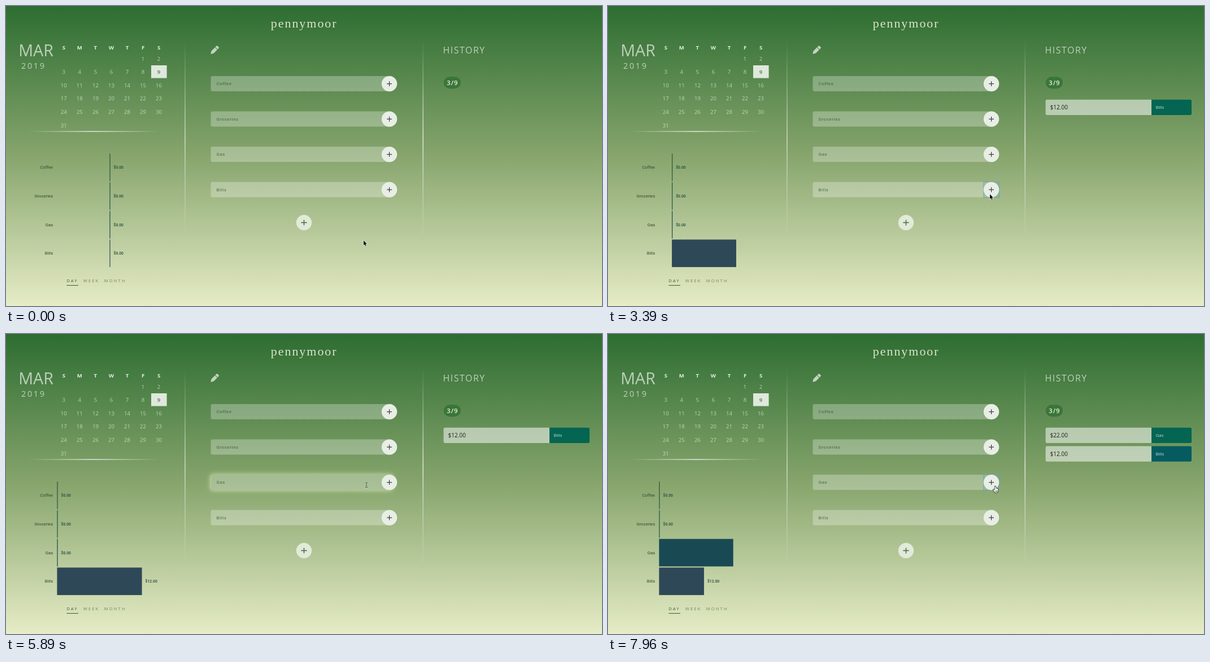
An HTML page with a canvas that plays this animation: 1055 px wide and 531 px high, repeating every 8000 ms.

```html
<!DOCTYPE html>
<html lang="en">
<head>
<meta charset="utf-8">
<title>Budget tracker</title>
<style>
html, body { margin: 0; width: 100%; height: 100%; overflow: hidden; background: #87a56d; }
canvas { display: block; width: 1055px; height: 531px; }
</style>
</head>
<body>
<canvas id="stage"></canvas>
<script>
const W = 1055, H = 531, LOOP = 8000;
const canvas = document.getElementById('stage');
const ctx = canvas.getContext('2d');
const dpr = window.devicePixelRatio || 1;
canvas.width = W * dpr;
canvas.height = H * dpr;

const OPEN = '"Open Sans", "Noto Sans", sans-serif';
const ROBOTO = 'Roboto, Arial, sans-serif';
const SERIF = '"Liberation Serif", "Times New Roman", serif';

const names = ['Coffee', 'Groceries', 'Gas', 'Bills'];
const barColors = ['#27543c', '#1b5548', '#194a54', '#2f4858'];
const fieldY = i => 124 + 62.5 * i;
const barY = i => 261.3 + 50.7 * i;

// Event times in ms
const FOCUS_BILLS = 700, ADD_BILLS = 2740, SHOW_VALUE = 4180;
const FOCUS_GAS = 5250, ADD_GAS = 7120, GROW = 1000;

const typed = {
  3: [[1450, '1'], [1760, '12'], [ADD_BILLS, '']],
  2: [[6050, '2'], [6350, '22'], [ADD_GAS, '']]
};

const path = [
  [0, 633, 415], [120, 633, 415], [650, 638, 326], [1850, 638, 326],
  [2300, 675, 333], [2720, 676, 333], [3450, 676, 333], [4020, 639, 281],
  [4140, 639, 281], [4500, 638, 267], [6400, 638, 267], [6880, 685.5, 270]
];

const clamp = v => Math.max(0, Math.min(1, v));
const mix = (a, b, p) => a + (b - a) * p;
const quadInOut = p => p < .5 ? 2 * p * p : 1 - 2 * (1 - p) * (1 - p);
const between = (t, a, b) => t >= a && t < b;

function text(s, x, y, font, color, spacing = 0, align = 'left') {
  ctx.font = font;
  ctx.fillStyle = color;
  ctx.textAlign = align;
  ctx.letterSpacing = spacing + 'px';
  ctx.fillText(s, x, y);
}

function box(x, y, w, h, r, color) {
  ctx.fillStyle = color;
  ctx.beginPath();
  ctx.roundRect(x, y, w, h, r);
  ctx.fill();
}

function circle(x, y, r, color) {
  ctx.fillStyle = color;
  ctx.beginPath();
  ctx.arc(x, y, r, 0, Math.PI * 2);
  ctx.fill();
}

function plus(x, y, r, width, color) {
  ctx.strokeStyle = color;
  ctx.lineWidth = width;
  ctx.beginPath();
  ctx.moveTo(x - r, y);
  ctx.lineTo(x + r, y);
  ctx.moveTo(x, y - r);
  ctx.lineTo(x, y + r);
  ctx.stroke();
}

function fadeLine(x, y, w, h, alpha) {
  const g = w > h ? ctx.createLinearGradient(x, 0, x + w, 0) : ctx.createLinearGradient(0, y, 0, y + h);
  g.addColorStop(0, 'rgba(255,255,255,0)');
  g.addColorStop(.5, `rgba(255,255,255,${alpha})`);
  g.addColorStop(1, 'rgba(255,255,255,0)');
  ctx.fillStyle = g;
  ctx.fillRect(x, y, w, h);
}

function poly(points, fill, stroke, width) {
  ctx.beginPath();
  points.forEach(([x, y], i) => i ? ctx.lineTo(x, y) : ctx.moveTo(x, y));
  ctx.closePath();
  if (stroke) {
    ctx.strokeStyle = stroke;
    ctx.lineWidth = width;
    ctx.stroke();
  }
  ctx.fillStyle = fill;
  ctx.fill();
}

function background() {
  const g = ctx.createLinearGradient(0, 0, 0, H);
  g.addColorStop(0, '#2d6d31');
  g.addColorStop(.5, '#87a56d');
  g.addColorStop(1, '#e6ecc6');
  ctx.fillStyle = g;
  ctx.fillRect(0, 0, W, H);
}

function pencil() {
  const color = '#c3d3bf';
  ctx.save();
  ctx.translate(362.3, 85);
  ctx.rotate(-Math.PI / 4);
  poly([[0, 0], [4.6, -2.9], [13.6, -2.9], [13.6, 2.9], [4.6, 2.9]], color);
  box(14.5, -2.9, 4.2, 5.8, [0, 1.4, 1.4, 0], color);
  ctx.restore();
}

function calendar() {
  text('MAR', 22.2, 89, `400 28.7px ${OPEN}`, 'rgba(255,255,255,.64)');
  text('2019', 27, 111, `400 14.5px ${OPEN}`, 'rgba(255,255,255,.64)', 2.6);
  const colX = c => 102.3 + 28.05 * c;
  [...'SMTWTFS'].forEach((d, c) =>
    text(d, colX(c), 77, `700 9.6px ${OPEN}`, 'rgba(255,255,255,.85)', 0, 'center'));
  box(257, 105, 27.6, 22.6, 0, '#dfe8dc');
  for (let day = 1; day <= 31; day++) {
    const cell = day + 4, today = day === 9;
    text(day, colX(cell % 7), 96.5 + 23.6 * Math.floor(cell / 7),
      `${today ? 600 : 400} 9.6px ${OPEN}`, today ? '#4f7a4a' : 'rgba(255,255,255,.6)', 0, 'center');
  }
  fadeLine(38, 221.4, 234, 1.4, .85);
}

function chart(t) {
  const first = quadInOut(clamp((t - ADD_BILLS) / GROW));
  const second = quadInOut(clamp((t - ADD_GAS) / GROW));
  const axis = mix(184, 91, first);
  const widths = [0, 0, 137 * second, mix(149 * first, 74.6, second)];
  const hidden = [false, false, t >= ADD_GAS, between(t, ADD_BILLS, SHOW_VALUE)];
  names.forEach((name, i) => {
    const y = barY(i), base = y + 27;
    text(name, 83.2, base, `400 7.75px ${ROBOTO}`, '#34472f', 0, 'right');
    ctx.fillStyle = barColors[i];
    ctx.fillRect(axis - .6, y, widths[i] + 1.2, 48.7);
    const value = i === 3 && t >= ADD_BILLS ? '$12.00' : '$0.00';
    if (!hidden[i]) text(value, axis + widths[i] + 6.6, base - .2, `500 6.8px ${ROBOTO}`, '#224a3c');
  });

  text('DAY', 107.3, 488.6, `400 7.6px ${OPEN}`, '#3f5a38', 2.1);
  text('WEEK', 136.8, 488.6, `400 7.6px ${OPEN}`, '#72835f', 2.1);
  text('MONTH', 173.8, 488.6, `400 7.6px ${OPEN}`, '#72835f', 2.1);
  ctx.fillStyle = '#3f5a38';
  ctx.fillRect(107.3, 494, 20.7, 1);
}

function glow(y, alpha) {
  if (alpha <= 0) return;
  ctx.save();
  ctx.beginPath();
  ctx.rect(340, y - 20, 370, 67);
  ctx.roundRect(362.5, y, 322, 27, 3);
  ctx.clip('evenodd');
  ctx.globalAlpha = alpha;
  ctx.shadowColor = 'rgba(226,244,186,.85)';
  ctx.shadowBlur = 8 * dpr;
  box(362.5, y, 322, 27, 3, '#dceab8');
  ctx.restore();
}

function entry(t, i) {
  const y = fieldY(i), mid = y + 13.6;
  const [on, off] = i === 3 ? [FOCUS_BILLS, ADD_BILLS] : i === 2 ? [FOCUS_GAS, ADD_GAS] : [LOOP, LOOP];
  glow(y, clamp((t - on) / 200) * (1 - clamp((t - off + 100) / 200)));
  box(362.5, y, 322, 27, 3, 'rgba(255,255,255,.28)');

  let value = '';
  for (const [time, s] of typed[i] || []) if (t >= time) value = s;
  if (value) text(value, 372.3, mid + 2.9, `500 8.3px ${ROBOTO}`, '#26331f', .5);
  else text(names[i], 372.5, mid + 2.8, `500 8px ${ROBOTO}`, 'rgba(38,72,34,.58)', .5);

  const ring = i === 3 ? between(t, ADD_BILLS - 40, FOCUS_GAS) : i === 2 && t >= ADD_GAS - 40;
  if (ring) {
    ctx.fillStyle = 'rgba(110,165,190,.28)';
    ctx.fillRect(665, y - .3, 27.4, 27.6);
    ctx.strokeStyle = '#6ba3ae';
    ctx.lineWidth = 1;
    ctx.strokeRect(665, y - .3, 27.4, 27.6);
  }
  circle(678.6, mid, 13.7, '#e8eee5');
  plus(678.6, mid, 4.4, 1.2, '#33403a');
}

function history(t) {
  text('HISTORY', 773.4, 83.5, `400 16px ${OPEN}`, 'rgba(255,255,255,.64)', 1.5);
  box(774.8, 125.2, 30.2, 21, 10.5, '#3a7638');
  text('3/9', 780.2, 140, `600 11.3px ${OPEN}`, '#eaf0e6', 1);
  const rows = [];
  if (t >= ADD_BILLS) rows.push(['$12.00', 'Bills']);
  if (t >= ADD_GAS) rows.unshift(['$22.00', 'Gas']);
  rows.forEach(([amount, label], i) => {
    const y = 165.8 + 32.8 * i;
    box(774.6, y, 187.4, 27.2, [2.5, 0, 0, 2.5], 'rgba(255,255,255,.53)');
    box(962, y, 71, 27.2, [0, 2.5, 2.5, 0], i ? '#065b61' : '#046552');
    text(amount, 782.6, y + 17.6, `400 10px ${OPEN}`, '#1f261d');
    text(label, 969.4, y + 16.3, `400 7.9px ${OPEN}`, '#c6ddd6');
  });
}

function pointAt(t) {
  for (let i = 1; i < path.length; i++) {
    const [t0, x0, y0] = path[i - 1], [t1, x1, y1] = path[i];
    if (t < t1) {
      const p = quadInOut((t - t0) / (t1 - t0));
      return [mix(x0, x1, p), mix(y0, y1, p)];
    }
  }
  return path[path.length - 1].slice(1);
}

function arrow() {
  poly([[0, 0], [0, 8.6], [1.9, 6.9], [3.2, 9.9], [4.6, 9.3], [3.3, 6.4], [5.9, 6.2]], '#111', '#f4f6ee', 1.2);
}

function beam() {
  const draw = (color, width) => {
    ctx.strokeStyle = color;
    ctx.lineWidth = width;
    ctx.beginPath();
    ctx.moveTo(-2, -4.2);
    ctx.quadraticCurveTo(0, -4.2, 0, -3);
    ctx.lineTo(0, 3.4);
    ctx.quadraticCurveTo(0, 4.6, -2, 4.6);
    ctx.moveTo(2, -4.2);
    ctx.quadraticCurveTo(0, -4.2, 0, -3);
    ctx.moveTo(0, 3.4);
    ctx.quadraticCurveTo(0, 4.6, 2, 4.6);
    ctx.stroke();
  };
  draw('rgba(255,255,255,.6)', 1.9);
  draw('#26301f', .9);
}

function hand() {
  ctx.lineJoin = 'round';
  poly([[-.9, 0], [.2, -.6], [1, 0], [1.2, 3.4], [2.6, 3.2], [3.9, 3.8], [5, 4.6], [4.9, 7.4],
    [4, 10.6], [-.7, 10.6], [-2.4, 8], [-3.8, 5.6], [-2.7, 5], [-.9, 6.6]], '#f8faf4', '#161a14', 1.5);
  ctx.strokeStyle = '#161a14';
  ctx.lineWidth = .6;
  ctx.beginPath();
  for (const x of [.5, 1.8, 3.1]) {
    ctx.moveTo(x, 7);
    ctx.lineTo(x, 9.4);
  }
  ctx.stroke();
  ctx.lineJoin = 'miter';
}

function cursor(t) {
  const [x, y] = pointAt(t);
  const inField = x > 362 && x < 692 && names.some((_, i) => y > fieldY(i) && y < fieldY(i) + 27);
  ctx.save();
  ctx.translate(x, y);
  if (inField && x < 665) beam();
  else if (inField && t > FOCUS_GAS) hand();
  else arrow();
  ctx.restore();
}

function draw(t) {
  ctx.setTransform(dpr, 0, 0, dpr, 0, 0);
  background();
  text('pennymoor', 468.8, 37.6, `400 22px ${SERIF}`, '#dde4cc', 1.95);
  calendar();
  fadeLine(316.2, 58, 1.5, 354, .62);
  fadeLine(737.4, 58, 1.7, 354, .68);
  pencil();
  names.forEach((_, i) => entry(t, i));
  circle(527.5, 383.4, 13.7, '#e2eada');
  plus(527.5, 383.4, 5, 1.6, '#4a7a42');
  history(t);
  chart(t);
  cursor(t);
}

const start = performance.now();
function tick() {
  draw((performance.now() - start) % LOOP);
  requestAnimationFrame(tick);
}
tick();
</script>
</body>
</html>
```
